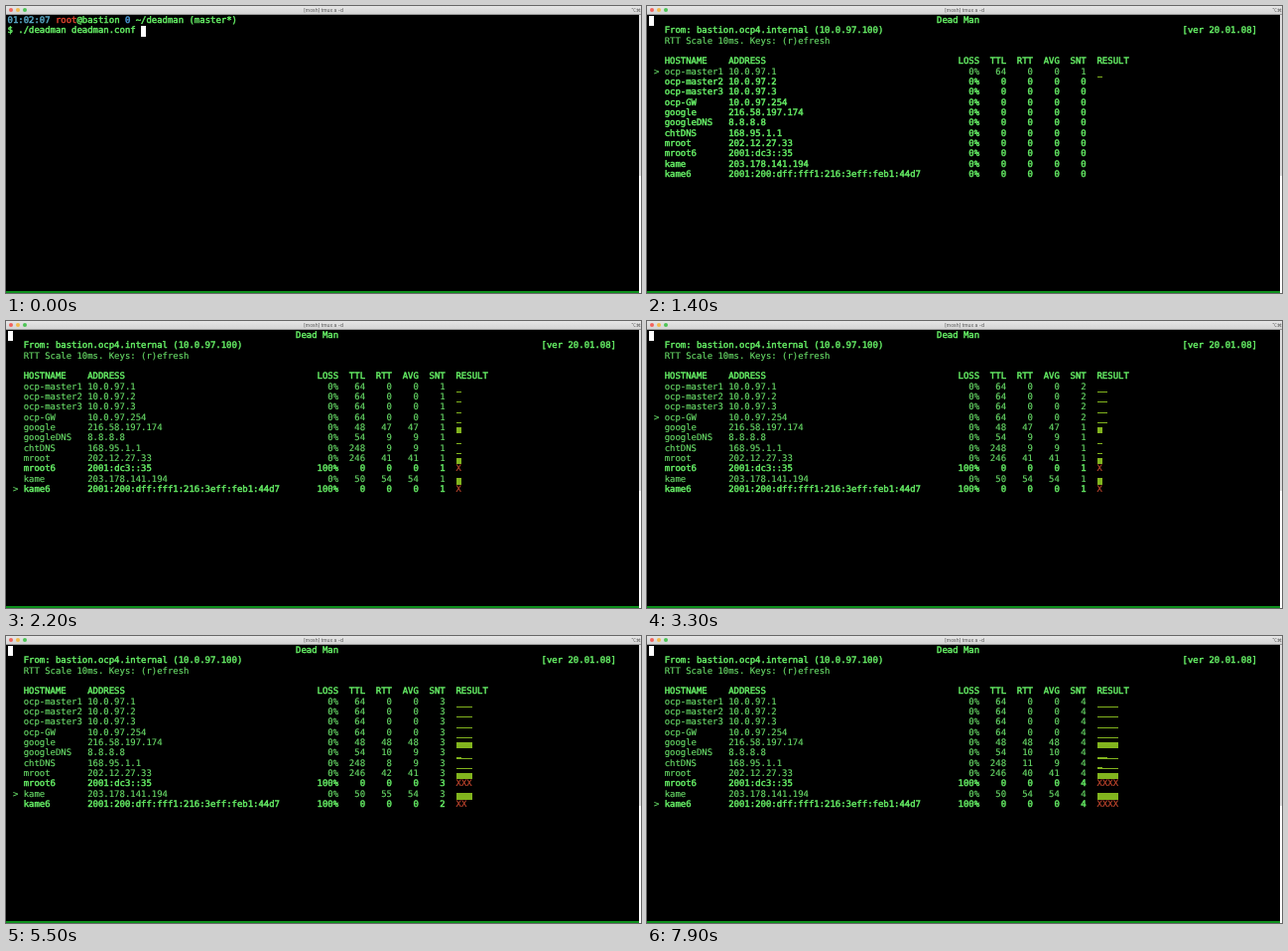
These frames come from a looping animation (640 px wide and 289 px high, 8000 ms). An HTML page:

```html
<!DOCTYPE html>
<html lang="en">
<head>
<meta charset="utf-8">
<title>deadman</title>
<style>
  html, body { margin: 0; width: 100%; height: 100%; overflow: hidden; background: #000; }
  #stage { position: relative; width: 640px; height: 289px; overflow: hidden; background: #000; }
  #bar { position: absolute; width: 640px; height: 8px; border-bottom: 1px solid #999;
    background: linear-gradient(#e6e6e6, #d4d4d4);
    font: 4.9px/8.6px Inter, "DejaVu Sans", sans-serif; color: #555; text-align: center; }
  #bar i { position: absolute; top: 1.7px; width: 4.4px; height: 4.4px; border-radius: 50%; }
  #bar span { position: absolute; left: 630px; white-space: nowrap; }
  #edge { position: absolute; left: 638px; top: 9px; width: 2px; height: 280px;
    background: linear-gradient(#ddd 162px, #fff 162px); }
  #status { position: absolute; top: 287px; width: 638px; height: 2px; background: #0c8f1c; }
  pre { position: absolute; left: 1.5px; top: 9.8px; margin: 0; color: #68dc68;
    font: 8.945px/10.36px "DejaVu Sans Mono", monospace; font-variant-ligatures: none;
    text-rendering: geometricPrecision; -webkit-text-stroke: .15px; }
  b { font-weight: 400; color: #66f066; -webkit-text-stroke: .45px; }
  .time { color: #5aaccb; }
  .root { color: #e0442f; }
  .code { color: #4d9fe0; }
  .lost { color: #c8482f; }
  .cell { display: inline-block; width: 5.385px; vertical-align: bottom; background: #82b41e; }
  .cursor { height: 10.36px; background: #fff; }
</style>
</head>
<body>
<div id="stage">
  <div id="bar">
    <i style="left:2.8px;background:#f4625c"></i>
    <i style="left:9.8px;background:#f2ba4c"></i>
    <i style="left:16.8px;background:#4cc455"></i>
    [mosh] tmux a -d<span>⌥⌘1</span>
  </div>
  <pre id="screen"></pre>
  <div id="edge"></div>
  <div id="status"></div>
</div>
<script>
const LOOP = 8000, TICK = 100;
const ENTER = 1100, START = 1365;               // key press, first ping
const OVERHEAD = 3, PING_GAP = 50, ROUND_GAP = 1000;
const ROUNDS = 4, LINE = 10.36;

// name, address, TTL, round trip times in ms (none: unreachable)
const hosts = [
  ["ocp-master1", "10.0.97.1", 64, [0, 0, 0, 0]],
  ["ocp-master2", "10.0.97.2", 64, [0, 0, 0, 0]],
  ["ocp-master3", "10.0.97.3", 64, [0, 0, 0, 0]],
  ["ocp-GW", "10.0.97.254", 64, [0, 0, 0, 0]],
  ["google", "216.58.197.174", 48, [46.8, 47.6, 48.2, 48]],
  ["googleDNS", "8.8.8.8", 54, [9, 9, 10, 10]],
  ["chtDNS", "168.95.1.1", 248, [9, 9, 8, 11]],
  ["mroot", "202.12.27.33", 246, [41, 40, 42, 40]],
  ["mroot6", "2001:dc3::35", 0, null],
  ["kame", "203.178.141.194", 50, [54, 54, 55, 54]],
  ["kame6", "2001:200:dff:fff1:216:3eff:feb1:44d7", 0, null],
];

const cursor = '<span class="cell cursor"></span>';
const bold = text => `<b>${text}</b>`;
const paint = (name, text) => `<span class="${name}">${text}</span>`;
const bar = rtt => {
  const eighths = Math.floor(rtt / 10) + 1;
  return `<span class="cell" style="height:${Math.floor(LINE * eighths / 8)}px"></span>`;
};

function columns(name, address, loss, ttl, rtt, avg, sent) {
  return name.padEnd(12) + address.padEnd(43) + loss.padStart(4) +
    [ttl, rtt, avg, sent].map(value => String(value).padStart(5)).join("") + "  ";
}

function shell(t) {
  const entered = t >= ENTER;
  return bold(paint("time", "01:02:07") + " " + paint("root", "root") + "@bastion " +
    paint("code", "0") + " ~/deadman (master*)\n$ ./deadman deadman.conf ") +
    (entered ? "\n" : "") + cursor;
}

function pingsAt(t) {
  const sent = hosts.map(() => 0);
  let active = 0, clock = START;
  for (let round = 0; round < ROUNDS; round++) {
    for (let i = 0; i < hosts.length; i++) {
      if (clock > t) return { sent, active };
      active = i;
      const times = hosts[i][3];
      clock += (times ? times[round] : 0) + OVERHEAD;
      if (clock <= t) sent[i]++;
      clock += PING_GAP;
    }
    clock += ROUND_GAP;
  }
  return { sent, active };
}

function hostLine([name, address, ttl, times], sent, active) {
  const seen = times ? times.slice(0, sent) : [];
  const up = seen.length > 0;
  const avg = up ? seen.reduce((a, b) => a + b) / sent : 0;
  const rtt = up ? seen[sent - 1] : 0;
  const loss = sent && !up ? "100%" : "0%";
  const text = columns(name, address, loss, up ? ttl : 0, Math.round(rtt), Math.round(avg), sent);
  const result = up ? seen.reverse().map(bar).join("") : paint("lost", "X".repeat(sent));
  return (active ? " &gt; " : "   ") + (up ? text : bold(text)) + result;
}

function monitor(t) {
  const { sent, active } = pingsAt(t);
  return [
    cursor + " ".repeat(53) + bold("Dead Man"),
    bold("   From: bastion.ocp4.internal (10.0.97.100)".padEnd(100) + "[ver 20.01.08]"),
    "   RTT Scale 10ms. Keys: (r)efresh",
    "",
    bold("   " + columns("HOSTNAME", "ADDRESS", "LOSS", "TTL", "RTT", "AVG", "SNT") + "RESULT"),
    ...hosts.map((host, i) => hostLine(host, sent[i], i === active)),
  ].join("\n");
}

const screen = document.getElementById("screen");
let shown = "";
function draw() {
  const t = Math.floor(performance.now() % LOOP / TICK) * TICK;
  const html = t < START ? shell(t) : monitor(t);
  if (html !== shown) screen.innerHTML = shown = html;
  requestAnimationFrame(draw);
}
draw();
</script>
</body>
</html>
```
